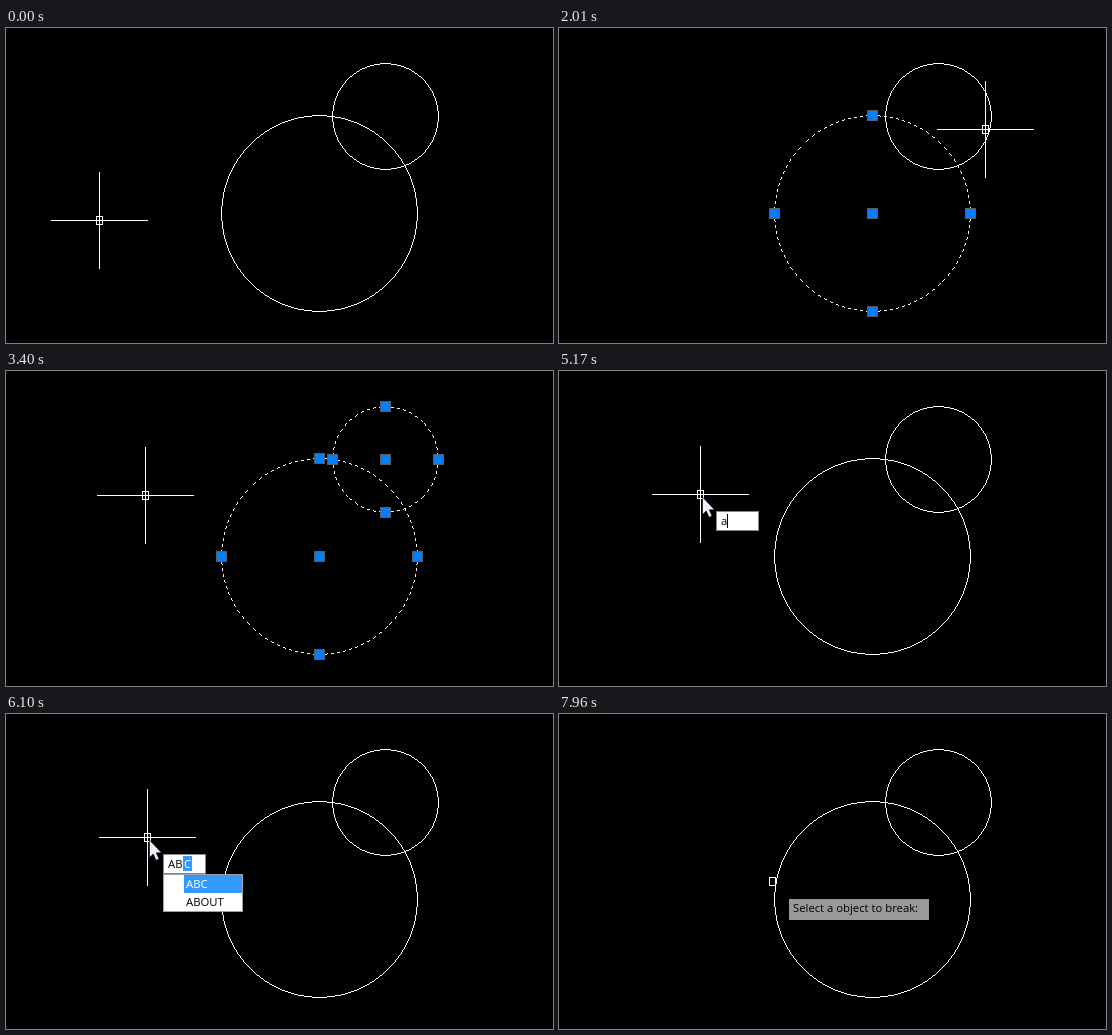
An HTML page that plays this animation: 547x315 px, repeating every 8 s.

```html
<!DOCTYPE html>
<html lang="en">
<head>
<meta charset="utf-8">
<title>Break command</title>
<style>
  html, body { margin: 0; width: 100%; height: 100%; overflow: hidden; background: #000; }
  svg { display: block; width: 100%; height: 100%; }
  text { font: 11.3px "Open Sans", "Noto Sans", sans-serif; white-space: pre; }
  rect, .line, .pixels { shape-rendering: crispEdges; }
  .line { fill: none; stroke: #fff; }
  .pixels { fill: #fff; }
</style>
</head>
<body>
<svg id="stage" viewBox="0 0 547 315"></svg>
<script>
const LOOP = 8000;
const STEP = 80;
const NS = "http://www.w3.org/2000/svg";
const stage = document.getElementById("stage");

function add(parent, tag, attrs = {}, content = "") {
  const el = document.createElementNS(NS, tag);
  for (const key in attrs) el.setAttribute(key, attrs[key]);
  el.textContent = content;
  parent.appendChild(el);
  return el;
}
const group = parent => add(parent, "g");
const box = (parent, x, y, width, height, fill) =>
  add(parent, "rect", { x, y, width, height, fill });
const label = (parent, x, y, content, fill = "#000") =>
  add(parent, "text", { x, y, fill }, content);
const show = (el, on) => el.setAttribute("display", on ? "inline" : "none");

function framed(parent, x, y, w, h, border, fill) {
  box(parent, x, y, w, h, border);
  box(parent, x + 1, y + 1, w - 2, h - 2, fill);
}

// One-pixel aliased circle; a dashed one skips every other run of three
function circlePath(cx, cy, r, dashed) {
  const edge = r - .2;
  let d = "";
  const dot = (x, y) => { d += `M${cx + x} ${cy + y}h1v1h-1z`; };
  const reach = Math.round(r * Math.SQRT1_2);
  for (let i = -reach; i <= reach; i++) {
    if (dashed && (i + 600) % 6 >= 3) continue;
    const j = Math.round(Math.sqrt(edge * edge - i * i));
    dot(i, j);
    dot(i, -j);
    dot(j, i);
    dot(-j, i);
  }
  return d;
}

// A circle with five grips that appear while it is selected
function makeCircle(x, y, r) {
  const ring = add(stage, "path", { class: "pixels" });
  const solid = circlePath(x, y, r, false);
  const dashed = circlePath(x, y, r, true);
  const grips = group(stage);
  for (const [dx, dy] of [[0, 0], [1, 0], [0, 1], [-1, 0], [0, -1]])
    framed(grips, x + dx * r - 5, y + dy * r - 5, 11, 11, "#5b5b5b", "#007fff");
  return on => {
    ring.setAttribute("d", on ? dashed : solid);
    show(grips, on);
  };
}
const selectBig = makeCircle(313, 185, 98);
const selectSmall = makeCircle(379, 88, 53);

// Drop-down list; the first row is highlighted
function makeList(width, rows, scroll) {
  const g = group(stage);
  const right = 157 + width - 1 - (scroll ? 17 : 0);
  framed(g, 157, 160, width, rows.length * 18 + 2, "#a0a0a0", "#fff");
  box(g, 178, 161, right - 178, 18, "#39f");
  rows.forEach((row, i) => label(g, 180, 174 + i * 18, row, i ? "#000" : "#fff"));
  if (scroll) {
    box(g, right, 161, 17, rows.length * 18, "#f0f0f0");
    box(g, right + 1, 178, 15, 32, "#cdcdcd");
  }
  return g;
}
const longList = makeList(260, ["A (ARC)", "AA (AREA)", "ABC", "ABOUT",
  "AL (ALIGN)", "AP (APPLOAD)", "AR (ARRAY)"], true);
const shortList = makeList(80, ["ABC", "ABOUT"], false);

const field = group(stage);
framed(field, 157, 140, 43, 20, "#888", "#fff");
const typed = label(field, 162, 154, "");
const caret = box(field, 168, 143, 1, 14, "#000");
const completion = group(field);
box(completion, 177, 142, 9, 15, "#39f");
label(completion, 178, 154, "C", "#fff");

const cursor = group(stage);
const cross = add(cursor, "path", { class: "line", d: "M-48 .5H49M.5 -48V49" });
add(cursor, "rect", { x: -2.5, y: -3.5, width: 6, height: 8, class: "line" });
const prompt = group(cursor);
box(prompt, 17, 18, 140, 21, "#999");
label(prompt, 21, 31, "Select a object to break:");

const arrow = add(stage, "path", {
  d: "M143.5 126V143.5L147.3 140L150 146.3L153 145L150.3 138.8H155.5Z",
  fill: "#f0f0fb", stroke: "#000", "stroke-width": .6
});

// Mouse moves, each from where the last one ended
const home = { x: 93, y: 192 };
const moves = [
  { from: 160, to: 630, x: 375, y: 106 },
  { from: 680, to: 860, x: 374, y: 105 },
  { from: 1460, to: 1690, x: 424, y: 101 },
  { from: 1930, to: 2010, x: 426, y: 101 },
  { from: 2110, to: 2170, x: 428, y: 108 },
  { from: 2620, to: 3030, x: 139, y: 124 },
  { from: 3860, to: 3930, x: 141, y: 123 },
  { from: 7020, to: 7580, x: 207, y: 166 },
  { from: 7960, to: 7960, x: 213, y: 167 }
];
const ease = p => p * p * (3 - 2 * p);

function progress(t, { from, to }) {
  if (t < from) return 0;
  if (t >= to) return 1;
  const sampled = (Math.floor((t - from) / STEP) + 1) * STEP;
  return ease(Math.min(1, sampled / (to - from + STEP)));
}

function cursorAt(t) {
  let { x, y } = home;
  for (const move of moves) {
    const p = progress(t, move);
    x += (move.x - x) * p;
    y += (move.y - y) * p;
  }
  return [Math.round(x), Math.round(y)];
}

function textAt(t) {
  if (t < 5560) return "a";
  if (t < 5940) return "A";
  return t < 6630 ? "AB" : "ABC";
}

function draw(t) {
  const within = (from, to) => t >= from && t < to;

  selectBig(within(1230, 4170));
  selectSmall(within(2240, 4170));

  const [x, y] = cursorAt(t);
  cursor.setAttribute("transform", `translate(${x} ${y})`);
  show(cursor, !within(3250, 3400));
  show(cross, t < 7020);
  show(prompt, t >= 7020);

  show(field, within(5170, 6790));
  typed.textContent = textAt(t);
  show(caret, within(5170, 5560));
  show(completion, within(6100, 6630));
  show(longList, within(5560, 6100));
  show(shortList, within(6100, 6710));
  show(arrow, within(5170, 5940) || within(6100, 6630));
}

const began = performance.now();
function tick() {
  draw((performance.now() - began) % LOOP);
  requestAnimationFrame(tick);
}
tick();
</script>
</body>
</html>
```
